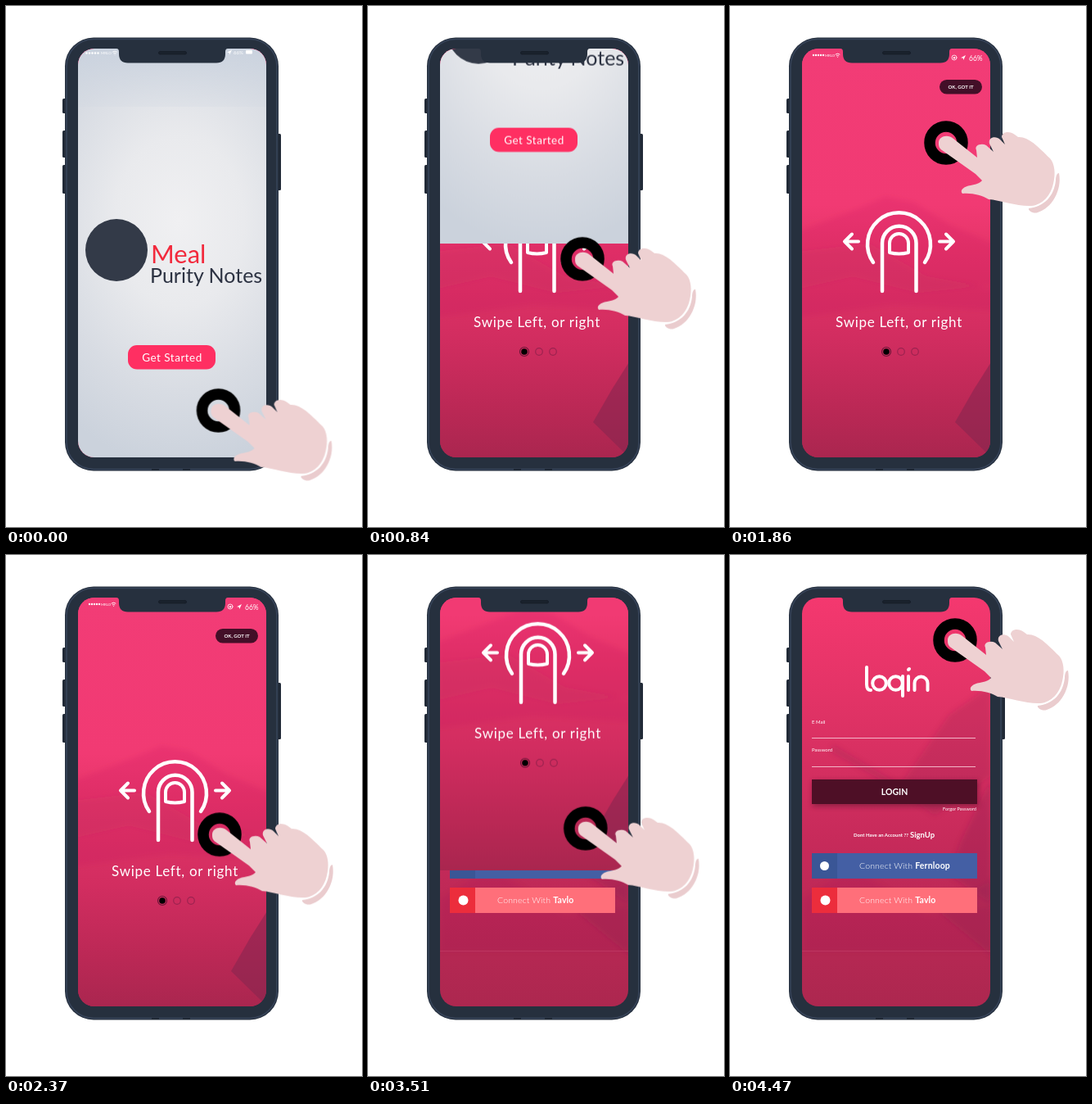
Animation of 435 by 636 pixels, one loop 4500 ms. Source, as an HTML page:

```html
<!DOCTYPE html>
<html lang="en">
<head>
<meta charset="utf-8">
<title>Swipe walkthrough</title>
<style>
html, body { margin: 0; width: 100%; height: 100%; overflow: hidden; background: #fff; }
svg { display: block; width: 435px; height: 636px; }
text { font-family: Lato, sans-serif; fill: #fff; }
.mid { text-anchor: middle; }
.end { text-anchor: end; }
.bold { font-weight: 700; }
.line { fill: none; stroke: #fff; stroke-linecap: round; stroke-linejoin: round; }
</style>
</head>
<body>
<svg viewBox="0 0 435 636">
  <defs>
    <radialGradient id="pale" gradientUnits="userSpaceOnUse" cx="0" cy="0" r="1" gradientTransform="translate(212 262) scale(225 300)">
      <stop offset="0" stop-color="#f0f0f2"/>
      <stop offset=".35" stop-color="#e9eaed"/>
      <stop offset=".7" stop-color="#d8dce3"/>
      <stop offset="1" stop-color="#cbd2dc"/>
    </radialGradient>
    <linearGradient id="haze" x1="0" y1="0" x2="0" y2="1">
      <stop offset="0" stop-color="#c8d1de" stop-opacity=".85"/>
      <stop offset="1" stop-color="#d0d7e1" stop-opacity=".25"/>
    </linearGradient>
    <linearGradient id="pink" gradientUnits="userSpaceOnUse" x1="0" y1="52" x2="0" y2="555">
      <stop offset="0" stop-color="#f23c76"/>
      <stop offset=".38" stop-color="#f13a73"/>
      <stop offset=".5" stop-color="#e43468"/>
      <stop offset=".7" stop-color="#d22d60"/>
      <stop offset=".88" stop-color="#ba2855"/>
      <stop offset="1" stop-color="#a9264f"/>
    </linearGradient>
    <linearGradient id="rose" gradientUnits="userSpaceOnUse" x1="0" y1="52" x2="0" y2="555">
      <stop offset="0" stop-color="#f4386f"/>
      <stop offset=".25" stop-color="#e23366"/>
      <stop offset=".6" stop-color="#c62a5a"/>
      <stop offset="1" stop-color="#ac274f"/>
    </linearGradient>
    <filter id="soft" x="-20%" y="-20%" width="140%" height="140%"><feGaussianBlur stdDeviation="3"/></filter>
    <clipPath id="screen"><rect x="88" y="52" width="230" height="499" rx="20"/></clipPath>
    <g id="wifi" class="line" stroke-width=".9">
      <path d="M-2.500-1.500Q0-3.500 2.500-1.500M-1.300 .2Q0-.8 1.300 .2M0 1.800V1.900"/>
    </g>
    <path id="arrow" d="M3-3L-3 .2L-.3 .4L.2 3Z" fill="#fff"/>
  </defs>

  <g fill="#212a37">
    <rect x="69" y="113" width="5" height="18" rx="1.500"/>
    <rect x="69" y="152" width="5" height="33" rx="1.500"/>
    <rect x="69" y="194" width="5" height="35" rx="1.500"/>
    <rect x="331" y="156" width="5" height="69" rx="1.500"/>
  </g>
  <rect x="72" y="38.500" width="261" height="529" rx="35" fill="#26303e"/>
  <rect x="74" y="40.500" width="257" height="525" rx="33" fill="none" stroke="#37445a" stroke-width="1.500"/>
  <path d="M178 566H187M216 566H225" stroke="#1a222d" stroke-width="1.500"/>

  <g clip-path="url(#screen)">
    <g id="login">
      <rect x="86" y="50" width="236" height="506" fill="url(#rose)"/>
      <g filter="url(#soft)" fill="#8d2450">
        <path d="M318 160L268 195L205 285L250 318L318 270Z" opacity=".22"/>
        <path d="M318 275L282 350L268 390L318 425Z" opacity=".3"/>
        <path d="M126 232L215 285L212 290L124 240Z" opacity=".25"/>
        <path d="M322 395L255 435L322 490Z" opacity=".25"/>
        <path d="M88 420L150 380L240 440L318 430V484H88Z" opacity=".1"/>
      </g>
      <path d="M88 483.500H318" stroke="#d45a80" stroke-width=".6" opacity=".6"/>
      <g class="line" stroke-width="4" role="img" aria-label="login">
        <path d="M167 137V158Q167 165 172 165"/>
        <circle cx="182.500" cy="156.500" r="8.300"/>
        <circle cx="202.500" cy="156.500" r="8.300"/>
        <path d="M211 148V172M218 148V165M218 140L219 139M225.500 165V156.500A8 8 0 0 1 241.500 156.500V165"/>
      </g>
      <text x="100" y="205.500" font-size="6">E Mail</text>
      <text x="100" y="240" font-size="6">Password</text>
      <path d="M100 223.500H300M100 258.500H300" stroke="#f3b6c8" stroke-width="1"/>
      <rect x="101" y="276" width="203" height="31" fill="#5d1230" opacity=".55" filter="url(#soft)"/>
      <rect x="100" y="274" width="202" height="30" fill="#4e0f26"/>
      <text class="mid bold" x="201" y="293" font-size="10.500">LOGIN</text>
      <text class="end" x="301" y="312" font-size="5.600">Forgor Password</text>
      <text class="end bold" x="218" y="344" font-size="6">Dont Have an Account ??</text>
      <text class="bold" x="220" y="344.500" font-size="9.500">SignUp</text>
      <rect x="100" y="364" width="202" height="31" fill="#445fa4"/>
      <rect x="100" y="364" width="31" height="31" fill="#3a5696"/>
      <circle cx="115.500" cy="379.500" r="5.500" fill="#fff"/>
      <text x="158" y="383" font-size="10.500" letter-spacing=".15" font-weight="300">Connect With <tspan class="bold">Fernloop</tspan></text>
      <rect x="100" y="406" width="202" height="31" fill="#ff6f7a"/>
      <rect x="100" y="406" width="31" height="31" fill="#ec2d3c"/>
      <circle cx="116.500" cy="421.500" r="6" fill="#fff"/>
      <text x="158" y="425" font-size="10.500" letter-spacing=".15" font-weight="300">Connect With <tspan class="bold">Tavlo</tspan></text>
    </g>

    <g id="swipe">
      <rect x="84" y="50" width="238" height="503" fill="url(#pink)"/>
      <g filter="url(#soft)" fill="#b3245a">
        <path d="M84 275L150 250L190 233L225 240L270 268L322 290V340L230 350L150 330L84 345Z" opacity=".13"/>
        <path d="M84 300L170 290L240 330L322 345V372L200 365L84 380Z" opacity=".12"/>
      </g>
      <path d="M322 430L298 468L275 508L316 548L322 545Z" fill="#84264f" opacity=".55"/>
      <g id="status">
        <g fill="#fff"><circle cx="102" cy="60" r="1.200"/><circle cx="105" cy="60" r="1.200"/><circle cx="108" cy="60" r="1.200"/><circle cx="111" cy="60" r="1.200"/><circle cx="114" cy="60" r="1.200"/></g>
        <text x="116" y="61.800" font-size="4.300">MRLO</text>
        <use href="#wifi" x="131.500" y="60.500"/>
        <circle class="line" cx="274" cy="63" r="3" stroke-width=".8"/>
        <rect x="272.800" y="62.300" width="2.400" height="2" fill="#fff"/>
        <use href="#arrow" x="285" y="63"/>
        <text x="292" y="66.500" font-size="8.500">66%</text>
      </g>
      <rect x="256" y="90" width="52" height="17.500" rx="8.750" fill="#430f28"/>
      <text class="mid bold" x="282" y="101" font-size="6">OK, GOT IT</text>
      <g class="line" stroke-width="4.500">
        <path d="M175 313A38.500 38.500 0 1 1 238 313"/>
        <path d="M186 348V289.500A20.700 20.700 0 0 1 227.500 289.500V348"/>
        <path d="M195 301V289.500A11.500 11.500 0 0 1 218 289.500V301Q206.500 304 195 301Z" stroke-width="4"/>
        <path d="M157 287.500H140M149 278.500L140 287.500L149 296.500M256 287.500H273M264 278.500L273 287.500L264 296.500" stroke-width="4"/>
      </g>
      <text class="mid" x="206.500" y="392" font-size="17" letter-spacing=".7">Swipe Left, or right</text>
      <g fill="none" stroke="#9c2350" stroke-width="1.200">
        <circle cx="191" cy="422" r="5.500" stroke="#6b1738"/>
        <circle cx="191" cy="422" r="3.800" fill="#000" stroke="none"/>
        <circle cx="209" cy="422" r="4.300"/>
        <circle cx="226" cy="422" r="4.300"/>
      </g>
    </g>

    <g id="splash">
      <rect x="86" y="50" width="236" height="505" fill="url(#pale)"/>
      <rect x="86" y="50" width="236" height="73" fill="url(#haze)"/>
      <g fill="#fff"><circle cx="98.500" cy="57.500" r="1.200"/><circle cx="102" cy="57.500" r="1.200"/><circle cx="105.500" cy="57.500" r="1.200"/><circle cx="109" cy="57.500" r="1.200"/><circle cx="112.500" cy="57.500" r="1.200"/></g>
      <text x="116" y="59.200" font-size="4.500">MRLO</text>
      <use href="#wifi" x="133" y="57.500"/>
      <use href="#arrow" x="273" y="56.500"/>
      <text x="278" y="58.500" font-size="6">66%</text>
      <rect x="293" y="54" width="8" height="4.500" rx="1" fill="#fff"/>
      <circle cx="135" cy="298" r="38" fill="#333a48"/>
      <text x="177" y="314" font-size="31" style="fill:#f2293c">Meal</text>
      <text x="176" y="338" font-size="25" style="fill:#2c3242">Purity Notes</text>
      <rect x="149" y="414" width="107" height="29.500" rx="11" fill="#ff2f62"/>
      <text class="mid" x="203" y="433.500" font-size="13.500" letter-spacing=".5">Get Started</text>
    </g>
  </g>

  <path d="M135 51H271V52Q268 52 268 56V58.500Q268 69.500 257 69.500H149Q138 69.500 138 58.500V56Q138 52 135 52Z" fill="#26303e"/>
  <rect x="186.500" y="55.500" width="34" height="3.500" rx="1.700" fill="#1a222d" stroke="#111821" stroke-width=".6"/>

  <g id="hand">
    <circle r="20" fill="none" stroke="#000" stroke-width="13.500"/>
    <path fill="#eed1d2" d="M-9 0C-9-8 2-11 9-5L38 18L37 9C34 3 43 0 49 3L58 11L53 1C51-7 61-9 66-4L72 2L68-7C68-14 78-15 84-10L88-7C100-8 112 4 127 19C133 26 134 38 131 50C128 64 118 76 104 77C88 78 66 70 52 69C44 64 32 61 20 62C16 58 22 53 30 52C36 51 42 49 44 46L36 38L-5 9C-9 6-9 3-9 0Z"/>
    <path fill="#eaccce" d="M138 37C142 58 129 80 112 85C107 87 100 83 101 80C120 78 132 65 134 46C134 42 135 37 138 37Z"/>
  </g>
</svg>
<script>
const LOOP = 4500;

// Each step is [time in ms, x, y], joined by straight moves.
const tracks = {
  splash: [[0, 0, 0], [49, 0, 0], [1550, 0, -503], [LOOP, 0, -503]],
  swipe: [[0, 0, 0], [3038, 0, 0], [3039, 1, 0], [4450, 1, -503], [LOOP, 1, -503]],
  hand: [
    [0, 259.5, 494], [1485, 264, 167], [1980, 264, 167],
    [2815, 257.5, 539], [4290, 275, 104], [LOOP, 275, 104]
  ]
};

for (const [id, steps] of Object.entries(tracks)) {
  const frames = steps.map(([t, x, y]) => ({
    offset: t / LOOP,
    transform: `translate(${x}px, ${y}px)`
  }));
  document.getElementById(id).animate(frames, { duration: LOOP, iterations: Infinity });
}
</script>
</body>
</html>
```
